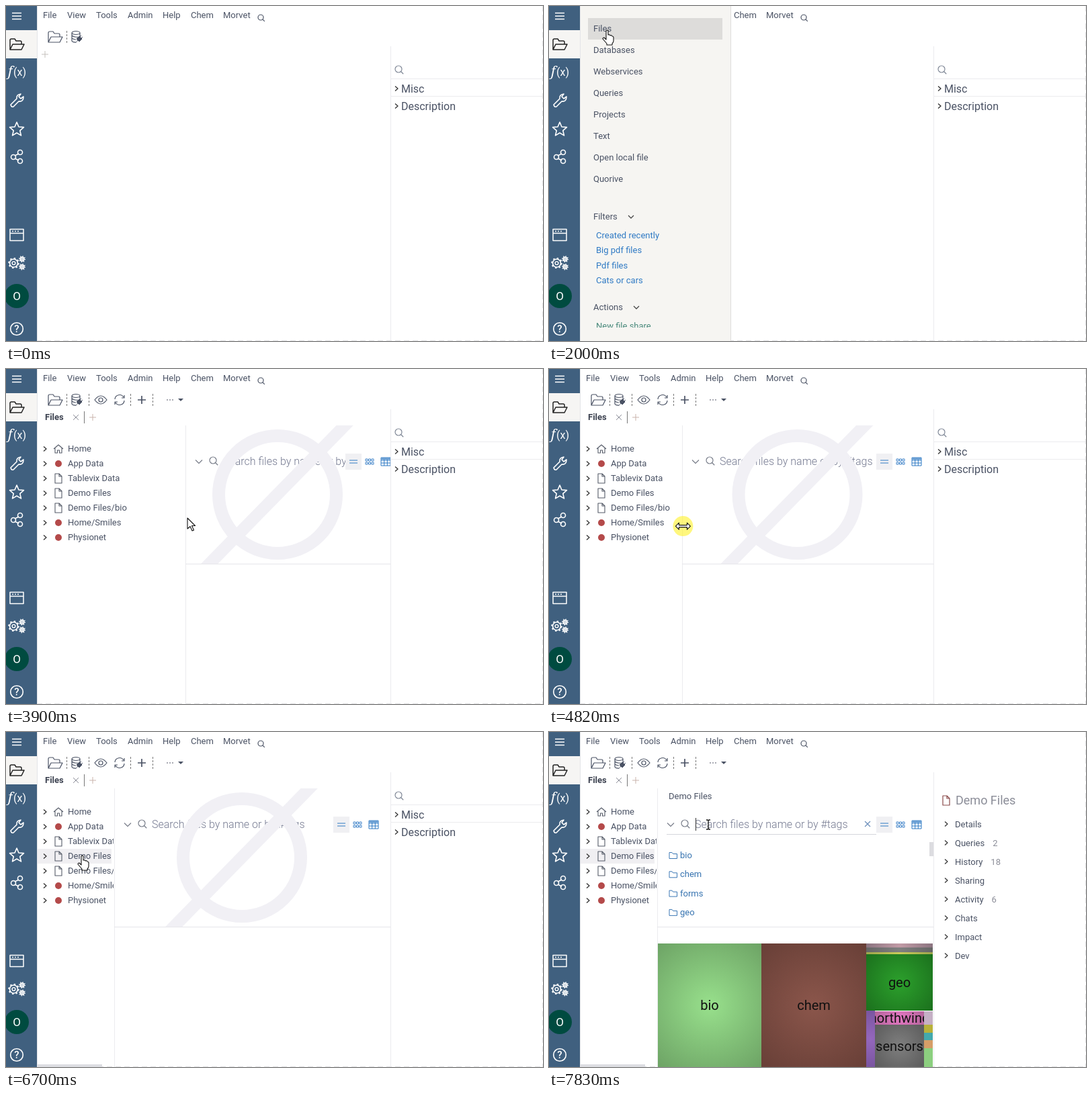
Animation of 799 by 499 pixels, one loop 8 s. Source, as an HTML page with a canvas:

```html
<!DOCTYPE html>
<html lang="en">
<head>
<meta charset="utf-8">
<style>
html, body { margin: 0; width: 100%; height: 100%; overflow: hidden; background: #fff; }
canvas { display: block; }
</style>
</head>
<body>
<canvas id="stage" width="799" height="499"></canvas>
<script>
const ctx = document.getElementById('stage').getContext('2d');
const LOOP = 8000;
const INK = '#4a5264', NAVY = '#40607f', BLUE = '#2f7ac4', RULE = '#ebebee', GREY = '#8b8d98';

// Pointer keyframes: time, x, y
const POINTER = [
  [400, 418, 500], [1150, 25, 58], [1610, 25, 58], [2000, 85, 36], [2530, 85, 36],
  [2880, 402, 200], [3140, 402, 200], [3270, 422, 247], [3630, 272, 223], [3900, 270, 222],
  [4030, 268, 222], [4500, 268, 222], [5020, 166, 240], [5430, 166, 240], [5620, 162, 241],
  [5890, 162, 241], [6290, 112, 184], [6750, 112, 184], [7360, 227, 130], [7430, 228, 132],
  [7510, 234, 136], [7700, 237, 138]
];
// Pointer shape from each time on
const SHAPES = [[400, 'arrow'], [1090, 'hand'], [2640, 'arrow'], [4040, 'resize'],
  [5960, 'arrow'], [6100, 'hand'], [6900, 'arrow'], [7300, 'beam']];
const CLICKS = [[1210, 1500], [2330, 2460], [4300, 5620], [6560, 6690], [7700, 7829]];

function pointerAt(t) {
  const next = POINTER.findIndex(k => k[0] > t);
  if (next < 0) return POINTER[POINTER.length - 1].slice(1);
  if (next === 0) return POINTER[0].slice(1);
  const a = POINTER[next - 1], b = POINTER[next];
  const p = (t - a[0]) / (b[0] - a[0]), e = p * p * (3 - 2 * p);
  return [a[1] + (b[1] - a[1]) * e, a[2] + (b[2] - a[2]) * e];
}

function text(s, x, y, color = INK, size = 13, weight = 400, align = 'left') {
  ctx.font = `${weight} ${size}px Roboto, sans-serif`;
  ctx.textAlign = align;
  ctx.fillStyle = color;
  ctx.fillText(s, x, y);
}
function box(x, y, w, h, color) {
  ctx.fillStyle = color;
  ctx.fillRect(x, y, w, h);
}
function disc(x, y, r, color) {
  ctx.fillStyle = color;
  ctx.beginPath();
  ctx.arc(x, y, r, 0, 7);
  ctx.fill();
}
function ring(x, y, r, color, width, dash = []) {
  ctx.strokeStyle = color;
  ctx.lineWidth = width;
  ctx.setLineDash(dash);
  ctx.beginPath();
  ctx.arc(x, y, r, 0, Math.PI * 2);
  ctx.stroke();
  ctx.setLineDash([]);
}
function icon(d, x, y, color = INK, width = 1.2, fill) {
  const path = new Path2D(d);
  ctx.save();
  ctx.translate(x, y);
  ctx.lineJoin = 'round';
  ctx.strokeStyle = color;
  ctx.lineWidth = width;
  if (fill) { ctx.fillStyle = fill; ctx.fill(path); }
  if (width) ctx.stroke(path);
  ctx.restore();
}
function dashed(d, color, dash) {
  ctx.setLineDash(dash);
  icon(d, 0, 0, color, 1);
  ctx.setLineDash([]);
}
function clipped(x, y, w, h, draw) {
  ctx.save();
  ctx.beginPath();
  ctx.rect(x, y, w, h);
  ctx.clip();
  draw();
  ctx.restore();
}

const FOLDER_OPEN = 'M-10 8V-6q0-2 2-2h5l2 3h6q2 0 2 2v3M-10 8l4-8h17l-4 8z';
const FOLDER = 'M-6-4h4l1.5 2h6v7h-11.500z';
const FILE = 'M-5-7h6l4 4v10h-10zM1-7v4h4';
const RIGHT = 'M-2-3.500l4 3.500l-4 3.500';
const DOWN = 'M-4-2l4 4l4-4';
const CROSS = 'M-4-4l8 8M4-4l-8 8';
const PLUS = 'M-5 0h10M0-5v10';
const HOME = 'M-7 0L0-6L7 0M-5-1V6h3.500V2h3v4H5v-7';

function magnifier(x, y, r, color) {
  ring(x - 1, y - 1, r, color, 1.2);
  icon(`M${r * .7 - 1} ${r * .7 - 1}l${r * .75} ${r * .75}`, x, y, color, 1.2);
}
function gear(x, y, r) {
  ring(x, y, r, '#fff', 1.7);
  ring(x, y, r + 1.3, '#fff', 2, [r * .4, (r + 1.3) * Math.PI / 4 - r * .4]);
  ring(x, y, r * .4, '#fff', 1.4);
}

function sidebar() {
  const white = '#fff';
  box(0, 0, 46, 499, NAVY);
  box(0, 36, 46, 42, '#f6f5f3');
  icon('M-7-4.500h14M-7 0h14M-7 4.500h14', 16, 15, white, 1.6);
  icon(FOLDER_OPEN, 16, 57, '#222', 1.5);
  ctx.font = 'italic 20px "Noto Serif", serif';
  ctx.textAlign = 'left';
  ctx.fillStyle = white;
  ctx.fillText('f', 3, 104);
  text('(x)', 11, 104, white, 16);
  icon('M-9 6L0-3Q-1-9 6-10l-3 4l3 3l4-3Q10 2 3 1L-5 9q-3 1-4-3z', 16, 141, white, 1.6);
  let star = '';
  for (let i = 0; i < 10; i++) {
    const r = i % 2 ? 5 : 11, a = i * Math.PI / 5;
    star += `${i ? 'L' : 'M'}${r * Math.sin(a)} ${-r * Math.cos(a)}`;
  }
  icon(star + 'z', 16, 184, white, 1.6);
  icon('M-3-2L3-5M-3 2L3 5', 16, 225, white, 1.6);
  [[11, 225], [21, 218], [21, 231]].forEach(([x, y]) => ring(x, y, 3.5, white, 1.6));
  icon('M-10-8.500h20v17h-20zM-10-2.500h20M-7-5.500h2M-3-5.500h2M1-5.500h2', 16, 341, white, 1.5);
  gear(11.5, 383, 6);
  gear(24, 377, 2.8);
  gear(24, 388.5, 2.8);
  disc(16, 432, 18, '#004b40');
  text('O', 16, 438, white, 17, 400, 'center');
  ring(16, 481, 9.3, white, 1.6);
  text('?', 16, 486, white, 15, 500, 'center');
}

function header(opened) {
  [['File', 55], ['View', 91], ['Tools', 134], ['Admin', 181], ['Help', 233], ['Chem', 275], ['Morvet', 323]]
    .forEach(([s, x]) => text(s, x, 18));
  magnifier(380, 18, 4, INK);
  icon(FOLDER_OPEN, 73, 46);
  icon('M-7-6a6 2.500 0 0 1 12 0a6 2.500 0 0 1-12 0v12a6 2.500 0 0 0 7 2M5-6v5M-7-2q3 3 9 2M-7 2q3 2 6 2', 105, 46);
  icon('M0 3l4-4l4 4l-4 4zM0 7l2-2M5 0l2-2M7 2l2-2', 105, 46, INK, 1, INK);
  const separator = x => dashed(`M${x}.5 37v18`, '#777', [3, 2]);
  separator(90);
  if (!opened) {
    icon(PLUS, 58, 72, '#c4c0bc', 1);
    return;
  }
  [123, 185, 218].forEach(separator);
  icon('M-9 0q9-12 18 0q-9 12-18 0z', 141, 46);
  ring(141, 46, 3, INK, 1.2);
  icon('M-7-1a7 7 0 0 1 13-3M7-7v4h-4M7 1a7 7 0 0 1-13 3M-7 7v-4h4', 169, 46);
  icon('M-6 0h12M0-6v12', 202, 46, INK, 1.7);
  [240, 244, 248].forEach(x => disc(x, 46, 1, GREY));
  icon('M-4-2h8l-4 4z', 260, 46, INK, 0, INK);
  text('Files', 58, 76, '#3c4250', 13, 700);
  icon(CROSS, 104, 72, GREY, 1);
  box(116, 63, 1, 18, '#777');
  icon(PLUS, 129, 72, '#c9b3ac', 1);
}

function tree(split, hovered) {
  const rows = [['Home', 'home'], ['App Data', 'store'], ['Tablevix Data', 'file'], ['Demo Files', 'file'],
    ['Demo Files/bio', 'file'], ['Home/Smiles', 'store'], ['Physionet', 'store']];
  clipped(47, 84, split - 48, 415, () => {
    if (hovered) box(47, 174, split - 51, 22, '#f0eff2');
    rows.forEach(([name, kind], i) => {
      const y = 119 + 22 * i;
      icon(RIGHT, 58, y, '#333', 1.3);
      if (kind === 'store') disc(78, y, 5, '#b44a4a');
      else icon(kind === 'home' ? HOME : FILE, 78, y, '#555b68', 1.1);
      text(name, 92, y + 4);
    });
  });
  if (split < 180) box(47, 495, 96, 4, '#dcdde2');
}

function browser(split, loaded, t) {
  const button = Math.max(499, split + 250);
  clipped(split, 84, 572 - split, 415, () => {
    box(split, 84, 1, 415, RULE);
    box(split, 290, 572 - split, 1, '#e6e6ea');
    icon('M-5-2.500l5 5l5-5', split + 20, 138, '#777c88', 1.1);
    magnifier(split + 42, 137, 5, '#777c88');
    clipped(split + 50, 120, button - 12 - split - 50, 32, () =>
      text('Search files by name or by #tags', split + 56, 143, '#747990', 16, 300));
    box(button - 12, 126, 24, 24, '#f0f0f3');
    icon('M-6-2h12M-6 2h12', button, 138, BLUE, 1.2);
    let cells = '';
    for (let i = 0; i < 6; i++) cells += `M${-6 + i % 3 * 4.5} ${i < 3 ? -4 : 1}h3v3h-3z`;
    icon(cells, button + 24, 138, BLUE, 0.9);
    icon('M-7-6h14v12h-14zM-7-2h14M-7 2h14M-2.300-6v12M2.300-6v12', button + 48, 138, BLUE, 1);
    icon('M-7-6h14v3h-14z', button + 48, 138, BLUE, 0, '#6a9fd4');
    if (!loaded) {
      const center = (split + 572) / 2 - 15.5;
      clipped(split, 84, 572 - split, 206, () => {
        ring(center, 187, 87.5, '#f1f0f5', 19);
        icon('M110-113L-111 113', center, 187, '#f1f0f5', 18);
      });
      return;
    }
    text('Demo Files', 178, 100);
    box(175, 152, 312, 1, '#d5d6dc');
    icon(CROSS, 474, 137, '#6c8fbb', 1.2);
    ['bio', 'chem', 'forms', 'geo'].forEach((name, i) => {
      const y = 183.5 + 28.3 * i;
      icon(FOLDER, 185, y, '#3d78b5', 1);
      text(name, 195, Math.round(y + 4.5), '#3673b0');
    });
    box(566, 164, 6, 21, '#dcdce0');
    if (t >= 7510) treemap();
    if (t >= 7700) box(218, 128, 1, 19, '#333');
  });
}

function tile(x, y, w, h, inner, outer, label) {
  const cx = x + w / 2, cy = y + h / 2;
  const fill = ctx.createRadialGradient(cx, cy, 0, cx, cy, Math.hypot(w, h) / 2);
  fill.addColorStop(0, inner);
  fill.addColorStop(1, outer);
  box(x, y, w, h, fill);
  if (label) clipped(x, y, w, h, () => text(label, cx, cy + 7, '#111', 20, 400, 'center'));
}
function treemap() {
  tile(162, 315, 154, 184, '#98e08c', '#6da365', 'bio');
  tile(316, 315, 156, 184, '#8b564b', '#683f37', 'chem');
  tile(472, 315, 99, 6, '#c29ba6', '#8b7480');
  tile(472, 321, 99, 7, '#808080', '#656565');
  tile(472, 328, 99, 3, '#c9cc58', '#9da54c');
  tile(472, 331, 99, 84, '#2ca02c', '#1b701d', 'geo');
  tile(472, 415, 13, 84, '#9467bd', '#7a55a0');
  tile(485, 416, 73, 20, '#e377c2', '#b5659c', 'northwind');
  tile(485, 436, 73, 63, '#7f7f7f', '#5b5b5b', 'sensors');
  [['#c5b0c5', 416, 20], ['#b8b13a', 436, 12], ['#43a9ad', 448, 11], ['#d69e68', 459, 12],
    ['#8ccf7f', 471, 28]].forEach(([c, y, h]) => box(558, y, 13, h, c));
}

function inspector(loaded) {
  box(572, 60, 1, 439, RULE);
  if (!loaded) {
    magnifier(585, 95, 5, '#7f8796');
    box(573, 108, 225, 1, RULE);
    box(573, 134, 225, 1, RULE);
    [['Misc', 123], ['Description', 149]].forEach(([s, y]) => {
      icon(RIGHT, 581, y, '#333', 1.3);
      text(s, 588, y + 6, INK, 16);
    });
    return;
  }
  icon(FILE, 591, 102, '#8a4a4a', 1.2);
  text('Demo Files', 605, 108, GREY, 18);
  [['Details'], ['Queries', 2], ['History', 18], ['Sharing'], ['Activity', 6], ['Chats'], ['Impact'], ['Dev']]
    .forEach(([s, count], i) => {
      const y = 138 + 28 * i;
      icon(RIGHT, 591, y - 1, '#333', 1.2);
      text(s, 604, y + 4);
      if (count) text(count, 616 + ctx.measureText(s).width, y + 4, GREY);
    });
}

function drawer(expanded, hovered) {
  box(46, 0, 225, 499, '#f6f5f2');
  box(270, 0, 1, 499, '#dedddb');
  if (hovered) box(58, 18, 200, 32, '#dddcda');
  text('Files', 66, 38);
  if (!expanded) {
    icon('M-4 2l4-4l4 4', 158, 2, '#c8c6c3', 1.5);
    icon(DOWN, 158, 67, '#c8c6c3', 1.5);
    return;
  }
  ['Databases', 'Webservices', 'Queries', 'Projects', 'Text', 'Open local file', 'Quorive']
    .forEach((s, i) => text(s, 66, 70 + 32 * i));
  text('Filters', 66, 318);
  icon(DOWN, 122, 314, '#444', 1.2);
  ['Created recently', 'Big pdf files', 'Pdf files', 'Cats or cars']
    .forEach((s, i) => text(s, 70, Math.round(346 + 22.3 * i), BLUE));
  text('Actions', 66, 453);
  icon(DOWN, 130, 449, '#444', 1.2);
  clipped(46, 460, 224, 19, () => text('New file share', 70, 481, '#4a8a7c'));
}

function tooltip() {
  ctx.save();
  ctx.shadowColor = 'rgba(0,0,0,.25)';
  ctx.shadowBlur = 5;
  ctx.shadowOffsetY = 1;
  box(27, 80, 228, 85, '#e4e3bd');
  ctx.restore();
  box(28, 81, 226, 83, '#fdfee3');
  text('Data', 37, 102, INK, 12);
  text('Drag files to open', 37, 135, INK, 12);
  text('Double-click or Ctrl+O to open file dialog', 37, 151, INK, 12);
}

function pointer(t) {
  const [x, y] = pointerAt(t);
  const shape = SHAPES.filter(s => s[0] <= t).pop()[1];
  if (CLICKS.some(([from, to]) => t >= from && t < to)) disc(x, y, 15, 'rgba(255,242,40,.6)');
  if (shape === 'arrow') icon('M0 0v16l4-3.500l3 6.500l2.500-1l-3-6.500h5z', x, y, '#111', 1.1, '#fff');
  if (shape === 'hand') {
    icon('M0 1q2-2 3 0v6q2-1 3 1q2-1 3 1q2 0 2 2v5q0 2-2 4v2h-8v-2l-6-7q0-2 2-2l3 3z', x, y, '#111', 1.1, '#fff');
  }
  if (shape === 'resize') {
    icon('M-11 0l5-5v3.500h12v-3.500l5 5l-5 5v-3.500h-12v3.500z', x, y, '#111', 1.1, '#fff');
  }
  if (shape === 'beam') icon('M-3-7h2l1 1l1-1h2M0-6v12M-3 7h2l1-1l1 1h2', x, y, '#111', 1.3);
}

function draw(t) {
  const opened = t >= 2530;
  box(0, 0, 799, 499, '#fff');
  dashed('M46 498.500H799M798.500 0V499', '#e2e2e4', [8, 5]);
  header(opened);
  if (opened) {
    const split = t < 4500 ? 267 : Math.min(267, Math.round(pointerAt(Math.min(t, 5620))[0]) - 1);
    tree(split, t >= 6160);
    browser(split, t >= 6820, t);
  }
  inspector(t >= 6950);
  if (t >= 1280 && t < 3270) drawer(t >= 1410, t >= 1800);
  sidebar();
  box(46, 0, 1, 499, '#e3e4e8');
  if (t >= 1150 && t < 1680) tooltip();
  if (t >= 400) pointer(t);
}

function tick() {
  draw(performance.now() % LOOP);
  requestAnimationFrame(tick);
}
tick();
</script>
</body>
</html>
```
